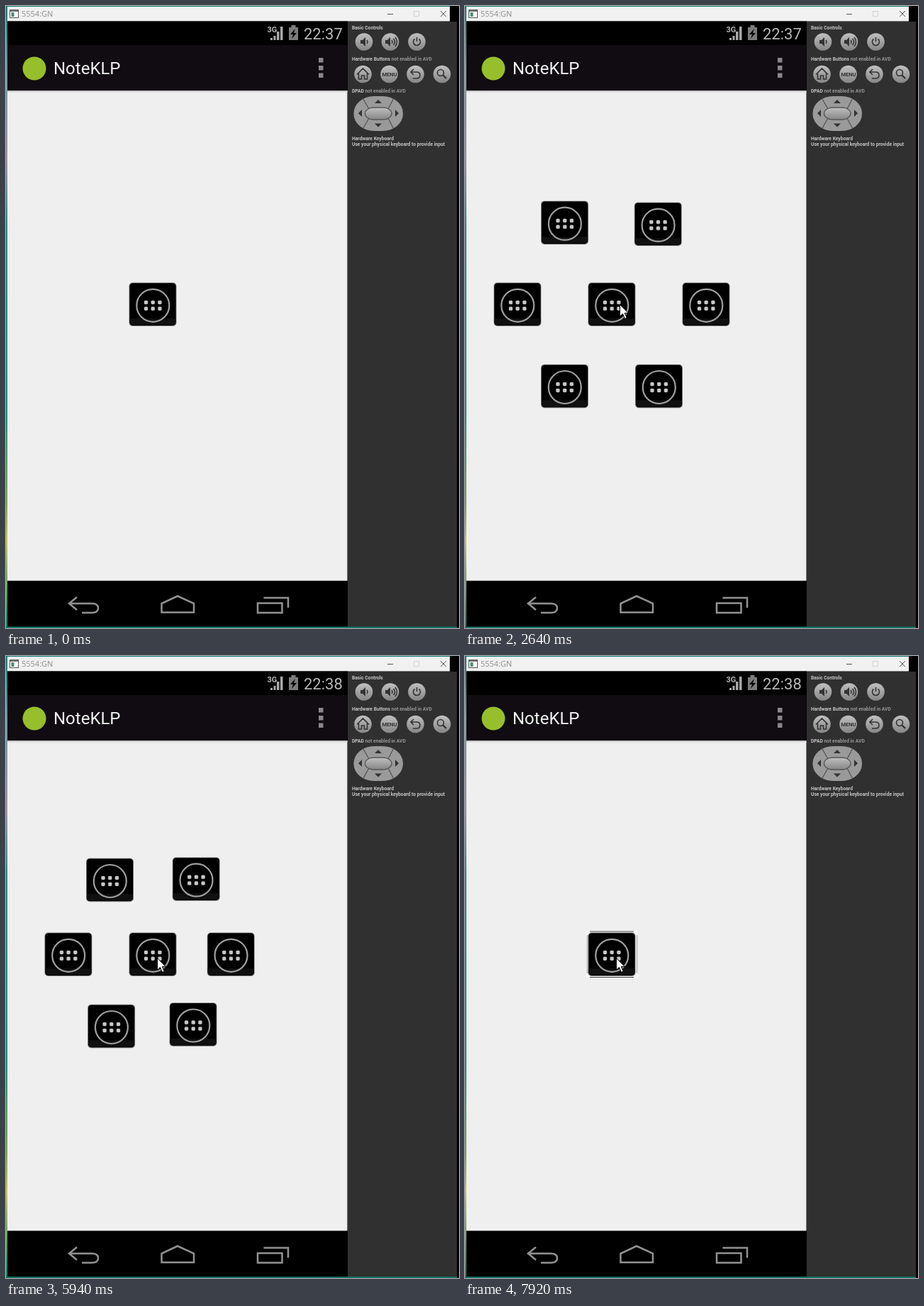
An HTML page that plays this animation: 639x876 px, repeating every 8000 ms.

```html
<!DOCTYPE html>
<html lang="en">
<head>
<meta charset="utf-8">
<title>Fan menu in an emulator</title>
<style>
  html, body { margin: 0; width: 100%; height: 100%; overflow: hidden; background: #000; }
  svg { display: block; width: 639px; height: 876px; font-family: Roboto, "Noto Sans", sans-serif; }
  .line { fill: none; stroke: #929292; stroke-width: 2.5; }
  .small { font-size: 6.7px; font-weight: 700; fill: #c4c4c4; }
  .dim { fill: #969696; }
  .glyph { fill: none; stroke: #333; stroke-width: 1.6; }
  .solid { fill: #333; }
</style>
</head>
<body>
<svg viewBox="0 0 639 876">
  <defs>
    <linearGradient id="wall" x1="0" y1="0" x2="0" y2="1">
      <stop offset="0" stop-color="#187f78"/>
      <stop offset=".1" stop-color="#6c9a9e"/>
      <stop offset=".25" stop-color="#a38fa6"/>
      <stop offset=".35" stop-color="#259088"/>
      <stop offset=".65" stop-color="#0c9580"/>
      <stop offset=".8" stop-color="#7fa64a"/>
      <stop offset=".86" stop-color="#c9c45a"/>
      <stop offset="1" stop-color="#0d7f6c"/>
    </linearGradient>
    <linearGradient id="metal" x1="0" y1="0" x2="0" y2="1">
      <stop offset="0" stop-color="#c0c0c0"/>
      <stop offset="1" stop-color="#858585"/>
    </linearGradient>
    <linearGradient id="shade" x1="0" y1="0" x2="0" y2="1">
      <stop offset="0" stop-color="#b4b4b4"/>
      <stop offset="1" stop-color="#efefef"/>
    </linearGradient>
    <clipPath id="padClip"><rect x="490.500" y="127" width="69.500" height="49" rx="29" ry="24"/></clipPath>
    <g id="tile">
      <rect x="-34" y="-31" width="69" height="63" fill="#efefef"/>
      <rect x="-33.500" y="-30.500" width="67" height="61.500" rx="5" fill="#8a8a8a"/>
      <rect x="-32.700" y="-29.700" width="65.400" height="59.700" rx="4.500"/>
      <path d="M-32.500 20H32.500V25q0 4-4 4H-28.500q-4 0-4-4Z" fill="#101010"/>
      <circle cx=".3" cy="1.800" r="23" fill="none" stroke="#a0a0a0" stroke-width="2.200"/>
      <g id="dots" fill="#c8c8c8" stroke="#c8c8c8" stroke-opacity=".3"></g>
    </g>
  </defs>

  <rect width="639" height="876"/>
  <rect width="3" height="876" fill="url(#wall)"/>
  <rect width="626" height="1" fill="#187f78"/>
  <rect y="874" width="636" height="2" fill="#126f62"/>

  <!-- window title -->
  <rect x="2" y="1" width="624" height="20.500" fill="#f1f1f1"/>
  <rect x="5.500" y="5.500" width="12" height="11" fill="#fff" stroke="#555"/>
  <path d="M6 7H17" stroke="#777" stroke-width="2"/>
  <rect x="7.500" y="9" width="4" height="6" fill="#4d8b72"/>
  <text x="22" y="14.500" font-size="11" fill="#8d8d8d" font-family="Open Sans, sans-serif">5554:GN</text>
  <path d="M538 11.500H546M613 7L621 15M621 7L613 15" stroke="#555" fill="none"/>
  <rect x="575.500" y="7.500" width="7" height="7" fill="none" stroke="#d4d4d4"/>

  <!-- phone screen -->
  <rect x="2" y="21.500" width="480" height="852.500"/>
  <rect x="2" y="55" width="479.500" height="64" fill="#100c11"/>
  <rect x="2" y="119" width="479.500" height="690.500" fill="#efefef"/>
  <rect x="2" y="119" width="479.500" height="3" fill="url(#shade)"/>
  <circle cx="40" cy="88" r="16.500" fill="#97bf2b"/>
  <text x="67" y="96" font-size="24" fill="#f2f2f2">NoteKLP</text>
  <path d="M441 73h6.500v6.500h-6.500zM441 84h6.500v6.500h-6.500zM441 94.500h6.500v6.500h-6.500z" fill="#8b858d"/>
  <text x="368.500" y="37" font-size="11" font-weight="700" fill="#b5b5b5">3G</text>
  <path d="M373 48v-3h3v3zM377.500 48v-6h3v6zM382 48v-12h3.500v12zM387 48v-19h3.500v19z" fill="#a9a9a9"/>
  <path d="M399 30h3.500v-3h6v3h3.500v18h-13z" fill="#7c7c7c"/>
  <path d="M408 32l-7 8h4l-2 6 7-8h-4z"/>
  <text id="clock" x="420" y="47" font-size="22" fill="#b8b8b8"></text>
  <path class="line" d="M100 832.500L89 841.500L100 850.500M89 841.500H121Q130 841.500 130 848Q130 854.500 121 854.500H107"/>
  <path class="line" d="M219.500 854V841.500L242 831L265 841.500V854Z"/>
  <path class="line" d="M355 841H389.500V854.500H355ZM363.500 833.500H398V847.500"/>

  <!-- emulator controls -->
  <rect x="482" y="22" width="154" height="852" fill="#303030"/>
  <g class="small">
    <text x="488" y="33">Basic Controls</text>
    <text x="488" y="76.500">Hardware Buttons <tspan class="dim">not enabled in AVD</tspan></text>
    <text x="488" y="122">DPAD <tspan class="dim">not enabled in AVD</tspan></text>
    <text x="488" y="189">Hardware Keyboard</text>
    <text x="488" y="196.500">Use your physical keyboard to provide input</text>
  </g>
  <g id="knobs"></g>
  <path class="solid" d="M500 48h3l4-4v13l-4-4h-3zM535 48h3l4-4v13l-4-4h-3z"/>
  <path class="glyph" d="M509 48q2 2.500 0 5M544 48q2 2.500 0 5M546.500 46q4 4.500 0 9M549 44q5 6.500 0 13"/>
  <path class="glyph" d="M576.500 46.500A5 5 0 1 0 582.500 46.500M579.500 44V50"/>
  <path class="glyph" d="M495 96.500L503.500 88L512 96.500M497.500 95V103H501.500V98H505.500V103H509.500V95"/>
  <text x="541" y="98.800" font-size="7.500" font-weight="700" text-anchor="middle" fill="#333">MENU</text>
  <path class="glyph" d="M575 89L571 93L575 97M571 93H580Q584 93.500 584 97.500Q584 102 579 102H574"/>
  <circle class="glyph" cx="613" cy="94" r="4.500"/>
  <path class="glyph" d="M616.500 97.500L621 102" style="stroke-width:2.400"/>
  <g clip-path="url(#padClip)">
    <rect x="490" y="127" width="70" height="49" fill="#9a9a9a"/>
    <path d="M500 124L512 145M550 124L539 145M500 179L512 158M550 179L539 158" stroke="#555" stroke-width="1.300"/>
  </g>
  <rect x="506.500" y="143" width="37.500" height="17" rx="12" ry="8.500" fill="url(#metal)" stroke="#555" stroke-width="1.300"/>
  <path class="solid" d="M520 137l5-5 5 5zM520 165.500l5 5 5-5zM502 146v10l-5-5zM549 146v10l5-5z"/>

  <g id="fan"></g>
  <g id="halo">
    <rect x="171" y="387" width="73" height="66" fill="#fafafa"/>
    <path d="M176 388H238M176 452.300H238" stroke="#444" stroke-width="1.200"/>
    <path d="M172.300 393V447M242.800 393V447" stroke="#999" stroke-width="1"/>
  </g>
  <use href="#tile" x="207" y="420"/>
  <path id="cursor" d="M.5 .5V17l4-3.600 3 7 2.800-1.300-3-6.500H12.300Z" fill="#fff" stroke="#000" stroke-width="1"/>
</svg>

<script>
const LOOP = 8000, STEP = 330, RADIUS = 133, HUB = [207, 420];
const NS = "http://www.w3.org/2000/svg";
const $ = id => document.getElementById(id);

function add(parent, tag, attrs) {
  const node = document.createElementNS(NS, tag);
  for (const key in attrs) node.setAttribute(key, attrs[key]);
  return parent.appendChild(node);
}

for (const y of [-2.6, 6.2])
  for (const x of [-9.5, 0.2, 9.9])
    add($("dots"), "rect", { x: x - 2.5, y: y - 2.5, width: 5, height: 5, rx: 1.4 });

for (const [x, y] of [[505, 50.5], [542, 50.5], [579.5, 50.5], [503.5, 96], [540.5, 96], [577.5, 96], [615, 96]])
  add($("knobs"), "circle", { cx: x, cy: y, r: 12.3, fill: "url(#metal)" });

const tiles = Array.from({ length: 6 }, () => add($("fan"), "use", { href: "#tile" }));

// [start ms, x, y]
const pointer = [
  [330, 32, 415], [660, 226, 419], [990, 218, 420], [3300, 211, 423], [3960, 208, 421],
  [4290, 465, 388], [4950, 221, 416], [5280, 214, 427], [5610, 213, 425]
];

// Progress at each screen refresh, in units of the first tile's duration
const opening = { start: 1320, steps: [0.05, 0.285, 0.697, 0.96, 1.37, 1.6] };
const closing = { start: 5940, steps: [0.272, 0.605, 0.925, 1.08, 1.38, 1.5] };

function progress({ start, steps }, t) {
  const i = Math.floor((t - start) / STEP);
  return i < 0 ? 0 : steps[Math.min(i, steps.length - 1)];
}

const ease = u => (1 - Math.cos(Math.PI * Math.min(u, 1))) / 2;

function draw(t) {
  const out = progress(opening, t), back = progress(closing, t);
  tiles.forEach((tile, i) => {
    const slow = 1 + i / 10;
    const reach = RADIUS * (ease(out / slow) - ease(back / slow));
    const angle = i * Math.PI / 3;
    const x = HUB[0] + reach * Math.cos(angle), y = HUB[1] + reach * Math.sin(angle);
    tile.setAttribute("transform", `translate(${x.toFixed(1)} ${y.toFixed(1)})`);
  });
  $("halo").style.display = t >= 7920 ? "" : "none";
  $("clock").textContent = t < 3300 ? "22:37" : "22:38";

  const spot = pointer.filter(p => p[0] <= t).pop();
  $("cursor").style.display = spot ? "" : "none";
  if (spot) $("cursor").setAttribute("transform", `translate(${spot[1]} ${spot[2]})`);
}

const begin = performance.now();
function tick() {
  draw((performance.now() - begin) % LOOP);
  requestAnimationFrame(tick);
}
tick();
</script>
</body>
</html>
```
